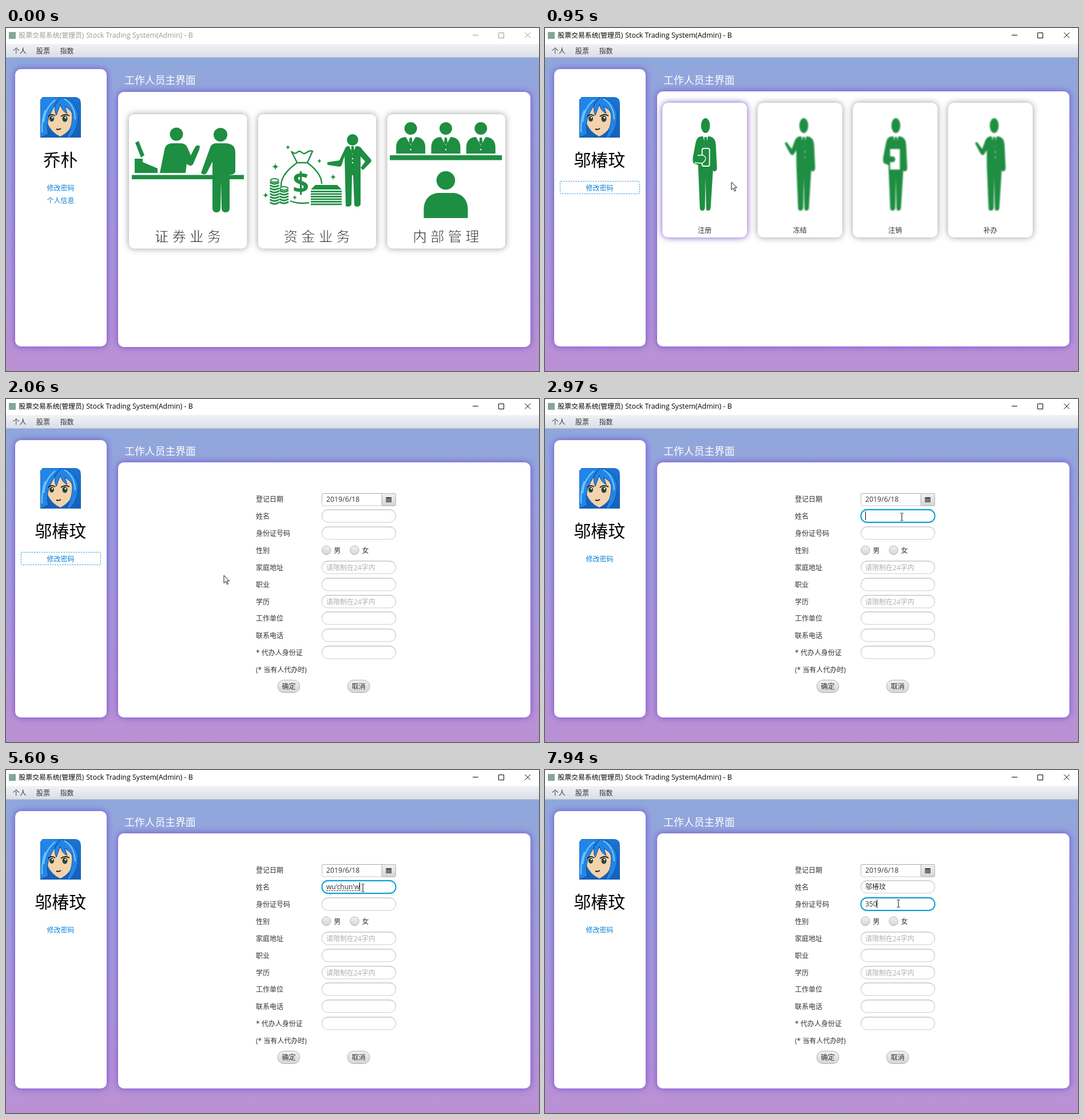
An HTML page for the animation above (8000 ms loop, 932 px wide and 601 px high).

```html
<!DOCTYPE html>
<html lang="zh-CN">
<head>
<meta charset="utf-8">
<title>股票交易系统</title>
<style>
  html, body { margin: 0; width: 100%; height: 100%; overflow: hidden; background: #fff; }
  svg { display: block; width: 100vw; height: 100vh; }
  text { font-family: 'Open Sans', 'Noto Sans CJK SC', 'Noto Sans CJK', sans-serif; font-size: 12px; fill: #333; white-space: pre; }
  .mid { text-anchor: middle; }
  .panel { fill: #fff; filter: drop-shadow(0 0 6px rgba(105, 60, 215, .85)); }
  .card { fill: #fff; filter: drop-shadow(0 0 6px rgba(0, 0, 0, .4)); }
  .card.hover { filter: drop-shadow(0 0 6px rgba(95, 50, 180, .85)); }
  .green { fill: #1e8e42; }
  .line { fill: none; stroke: #1e8e42; }
  .white { fill: #fff; }
  .soft { filter: blur(.9px); }
  .link { fill: #0a80d6; }
  .hint { fill: #aab2ab; }
  .name { font-size: 30px; fill: #000; }
  .big { font-size: 24.3px; font-weight: 300; fill: #222; stroke: #fff; stroke-width: .7; }
  .field { fill: #fff; stroke: url(#edge); }
  .field.focus { stroke: #039ed3; stroke-width: 1.8; filter: drop-shadow(0 0 1px #8fd4ee); }
  .button { fill: url(#metal); stroke: #b2b2b2; }
  .ink { stroke: #000; fill: none; }
</style>
</head>
<body>
<svg id="stage" viewBox="0 0 932 601" preserveAspectRatio="none" xmlns="http://www.w3.org/2000/svg"></svg>
<script>
const LOOP = 8000;
const STAFF = '邬椿玟';

// ---- drawing helpers ----
const text = (x, y, s, cls = '', more = '') => `<text x="${x}" y="${y}" class="${cls}" ${more}>${s}</text>`;
const rect = (x, y, w, h, r = 0, cls = 'green', more = '') =>
  `<rect x="${x}" y="${y}" width="${w}" height="${h}" rx="${r}" class="${cls}" ${more}/>`;
const path = (d, cls = 'green', more = '') => `<path d="${d}" class="${cls}" ${more}/>`;
const dot = (x, y, r, cls = 'green') => `<circle cx="${x}" cy="${y}" r="${r}" class="${cls}"/>`;
const at = (x, y, body, more = '') => `<g transform="translate(${x} ${y})" ${more}>${body}</g>`;
const range = (n, f) => Array.from({ length: n }, (_, i) => f(i)).join('');
const scene = (id, body) => `<g id="${id}">${body}</g>`;
const grad = (id, ...stops) => `<linearGradient id="${id}" x2="0" y2="1">` +
  stops.map((c, i) => `<stop offset="${i / (stops.length - 1)}" stop-color="${c}"/>`).join('') + '</linearGradient>';

// ---- people ----
const BUST = 'M-25.5 44V33C-25.5 20-17 15-8 15H8C17 15 25.5 20 25.5 33V44Z';
const bust = suit => dot(0, 0, 11) + path(BUST) + (suit
  ? path('M-9 14L0 30 9 14Z', 'white') + path('M-2 16H2L3 25 0 29-3 25Z') + dot(0, 37, 1.3, 'white') : '');
const row = (x, y, suit) =>
  range(3, i => at(x + 61.3 * i, y, bust(suit))) + rect(x - 36.5, y + 47, 196, 8.5);

const ARMS = {
  folded: 'L-13 240L-21 237Q-23 234-22 226L-17 200Q-15 191-8 190Z',
  raised: 'L-13 214L-18 222Q-21 224-24 220L-33 203Q-33 198-29 201L-21 212-16 198Q-13 191-8 190Z'
};
const stander = (x, arm, extra = '', cls = '') => at(x, 0,
  '<ellipse cy="171" rx="7.8" ry="13" class="green"/>' +
  path('M-8 190H8Q17 192 18 204L20 246Q19 252 15 251L13 250 9 314Q9 320 4 320Q1 320 1 314L0 262-1 314Q-1 320-6 320Q-10 320-10 314L-13 240' + ARMS[arm]) +
  path('M-4.5 189L0 209 4.5 189Z', 'white') + path('M-2 191h4l1 12-3 5-3-5Z') + extra, `class="${cls}"`);
const buttons = dot(2, 217, 1, 'white') + dot(2, 227, 1, 'white');
const phone = rect(-6, 211, 13, 31, 3, 'green', 'stroke="#fff" stroke-width="1.8"') +
  path('M-14 223H-4Q1 226 0 230T-6 237L-19 236', 'green', 'stroke="#fff" stroke-width="1.3"');
const paper = rect(-10, 212, 17, 36, 0, 'white') + path('M-16 225H-4Q2 230-4 235H-16Z');

// ---- card pictures ----
const counter =
  path('M226 201L232 198 242 223 236 227ZM225 229H239V235L265 246V254H225Z') +
  rect(220, 257.5, 196, 7.5) + dot(298, 186, 11.5) +
  path('M269 254L277 214Q279 202 291 202H305Q315 202 318 211L323 223 331 208Q334 204 339 207L338 213 327 239Q322 244 316 238L314 254Z') +
  dot(375, 187, 12) +
  path('M366 202H385Q401 203 401 218V252Q400 257 391 257V317Q390 323 384 323T377 317L376 268 375 317Q374 323 368 323T361 317V234L351 254Q346 259 341 254L356 212Q358 203 366 202Z');

const star = ([x, y, r]) => at(x, y, path(`M0-${r}Q0 0 ${r} 0Q0 0 0 ${r}Q0 0-${r} 0Q0 0 0-${r}Z`));
const coins = (x, y, n) => `<ellipse cx="${x}" cy="${y}" rx="7" ry="3" class="line" stroke-width="2"/>` +
  range(n, i => path(`M${x - 7} ${y + 4 + 5 * i}q7 4.5 14 0`, 'line', 'stroke-width="2.8" stroke-linecap="round"'));
const money =
  [[493, 209, 5], [471, 243, 7], [454, 293, 6], [548, 233, 5], [572, 261, 6], [505, 297, 5]].map(star).join('') +
  path('M509 236L499 216Q505 222 509 218T517 218T526 218T536 216L527 236H509C492 248 480 262 481 278M527 236C543 248 552 260 552 273M497 303Q510 309 530 306', 'line', 'stroke-width="2.4"') +
  text(515.5, 288.5, '$', 'mid', 'style="font-size:50px;font-weight:700;fill:#1e8e42"') +
  coins(469.5, 267, 8) + coins(486, 281, 5) +
  path('M541 275H579L587 283H533Z') + range(6, i => rect(533, 285 + 4.5 * i, 54, 2.8)) +
  dot(606, 196, 10) +
  path('M598 207h16q6 0 9 6l15 17q2 3-1 6l-13 13-4-4 8-11-8-9L620 309q-1 4-6 4-5 0-5-4L607 258h-2L604 309q-1 4-6 4-5 0-4-4L592 224l-5 16q-1 3-4 3l-20-3q-3-3 0-5l20-3 9-19q2-6 6-6z') +
  path('M600 206L606 222 612 206Z', 'white') + path('M604 207h4l1 10-3 4-3-4Z') +
  dot(606, 229, 1.2, 'white') + dot(606, 236, 1.2, 'white');

const office = row(707.7, 176, true) + dot(769, 267, 16.3) +
  path('M730.5 333V318C730.5 298 744 289 757 289H781C794 289 807.5 298 807.5 318V333Z');

// ---- scenes ----
const home = rect(196, 112, 721, 447, 10, 'panel') +
  ['证 券 业 务', '资 金 业 务', '内 部 管 理'].map((s, i) =>
    rect(215 + 225.8 * i, 151, 206.5, 235.5, 9, 'card', i ? '' : 'id="first"') +
    text(318 + 225.8 * i, 373.5, s, 'big mid')).join('') + counter + money + office;

const grid = ['注册', '冻结', '注销', '补办'].map((s, i) =>
    rect(205.3 + 166.5 * i, 131, 148, 236, 10, i ? 'card' : 'card hover') +
    text(279.3 + 166.5 * i, 359, s, 'mid')).join('') +
  stander(280.7, 'folded', phone) + stander(452.5, 'raised', buttons, 'soft') +
  stander(613.5, 'folded', paper, 'soft') + stander(785.5, 'raised', buttons, 'soft');

const pair = ['个人注册', '公司注册'].map((s, i) =>
    rect(213 + 225.5 * i, 150.5, 212, 235.5, 10, i ? 'card' : 'card hover') +
    text(318.8 + 225.5 * i, 372, s, 'mid') + row(257.5 + 225.5 * i, 236, i)).join('');

const LABELS = ['登记日期', '姓名', '身份证号码', '性别', '家庭地址', '职业', '学历', '工作单位', '联系电话', '* 代办人身份证', '(* 当有人代办时)'];
const rowY = i => Math.round(175.4 + 29.85 * i);
const pill = i => rect(552.5, rowY(i) - 11, 129, 22, 10.5, 'field', `id="field${i}"`);
const form = LABELS.map((s, i) => text(437, rowY(i) + 4.5, s)).join('') +
  [1, 2, 4, 5, 6, 7, 8, 9].map(pill).join('') +
  [4, 6].map(i => text(560, rowY(i) + 4.5, '请限制在24字内', 'hint')).join('') +
  rect(552.5, 165.5, 129, 21.5, 2.5, 'field') + text(560, 180.3, '2019/6/18', '', 'style="font-size:12.3px"') +
  rect(657, 165.5, 24.5, 21.5, 2.5, 'button') + rect(664.5, 172, 9.5, 9, 0, '', 'fill="#444"') +
  range(9, i => rect(665.5 + 2.8 * (i % 3), 174.6 + 2.1 * Math.floor(i / 3), 1.8, 1.2, 0, '', 'fill="#ccc"')) +
  ['男', '女'].map((s, i) => dot(560.2 + 49.3 * i, 265, 7.7, 'button') + text(573.3 + 49.3 * i, 269.7, s)).join('') +
  ['确定', '取消'].map((s, i) => rect(475.2 + 122.2 * i, 492.5, 38.5, 22, 10.5, 'button') +
    text(494.5 + 122.2 * i, 508, s, 'mid')).join('') +
  text(560, 209, '', '', 'id="nameText"') + text(560, 239, '', '', 'id="idText"') +
  '<path id="compose" stroke="#333" stroke-dasharray="3 1.5"/>' +
  rect(0, 0, 1, 15, 0, '', 'id="caret" fill="#000"');

const avatar = '<g clip-path="url(#face)">' + rect(60, 121, 71, 71, 0, '', 'fill="url(#hair)"') +
  path('M72 150Q80 134 100 137 116 142 118 160 115 180 95 190 80 184 72 166Z', '', 'fill="#f3d3ab"') +
  path('M60 121H96Q84 135 76 154 70 168 74 186L60 192ZM96 121Q122 126 126 152 127 176 112 192H106Q119 166 115 146L103 137 107 150Q98 146 95 134L88 153Q84 146 86 132Z', '', 'fill="#2185e8" stroke="#123f80" stroke-width=".8"') +
  path('M66 165Q68 140 86 126M102 124Q120 134 121 160M63 183Q62 160 69 144', '', 'fill="none" stroke="#6fc0fa" stroke-width="2.4"') +
  path('M74 155q5-6 12-1M96 155q7-6 15-1M88 177q4 2 8-1', '', 'fill="none" stroke="#2b1f1c" stroke-width="2"') +
  '<ellipse cx="80" cy="159" rx="4" ry="5" fill="#24453d"/><ellipse cx="103" cy="159" rx="4.5" ry="5.5" fill="#24453d"/>' +
  dot(81, 157, 1.3, 'white') + dot(104, 157, 1.5, 'white') + '</g>';

stage.innerHTML = '<defs>' +
  grad('sky', '#8fa7dc', '#a49cd8', '#bb90d4') + grad('bar', '#f0f2f7', '#dadde4') + grad('metal', '#f1f1f1', '#d5d5d5') +
  grad('edge', '#a9a9a9', '#cccccc') + grad('hair', '#1b74d2', '#1560b8') +
  '<clipPath id="face"><path d="M64 121H122Q131 122 131 133V192H60V126Z"/></clipPath></defs>' +
  rect(0, 0, 932, 601, 0, 'white') + rect(0, 52, 932, 549, 0, '', 'fill="url(#sky)"') +
  rect(0, 28, 932, 24, 0, '', 'fill="url(#bar)"') + rect(0, 51, 932, 1, 0, '', 'fill="#b9bfd0"') +
  rect(5, 7, 12, 12, 0, '', 'fill="#83a898"') +
  '<g id="title">' + text(22.3, 17.3, '股票交易系统(管理员)', '', 'style="fill:inherit;font-size:11.9px"') +
  text(140.2, 17.3, 'Stock Trading System(Admin) - B', '', 'style="fill:inherit;font-size:12.45px"') +
  path('M816 12.5h10M861.5 8.5h9v9h-9zM907.5 8l9.5 9.5m0-9.5l-9.5 9.5', '', 'fill="none"') + '</g>' +
  ['个人', '股票', '指数'].map((s, i) => text(11.7 + 41.4 * i, 45, s)).join('') +
  rect(16, 72, 160, 486, 10, 'panel') + avatar +
  text(95.3, 242, '', 'name mid', 'id="owner"') + text(95.5, 284.5, '修改密码', 'link mid') +
  text(95.5, 306.5, '个人信息', 'link mid', 'id="profile"') +
  rect(26.5, 268.5, 139, 22, 1, '', 'id="ring" fill="none" stroke="#2a9fd8" stroke-dasharray="2.5 1.8"') +
  text(207.3, 97.5, '工作人员主界面', '', 'style="font-size:17.8px;fill:#fff"') +
  scene('main', rect(196, 111, 721, 447, 10, 'panel')) +
  scene('home', home) + scene('grid', grid) + scene('pair', pair) + scene('form', form) +
  scene('arrow', path('M0 0V13.5L3.2 10.6 5.6 15.8 7.6 14.9 5.3 9.8H9.6Z', '', 'fill="#fff" stroke="#000" stroke-width=".9"')) +
  scene('beam', path('M-2.5-6.5H-.5M.5-6.5H2.5M0-6V6M-2.5 6.5H-.5M.5 6.5H2.5', 'ink'));

// ---- timeline ----
const PATH = [[170, 395, 540], [630, 318, 262], [800, 318, 262], [950, 326, 270], [1090, 326, 270], [1420, 314, 258],
  [1570, 314, 258], [1750, 407, 327], [1890, 407, 327], [2060, 381, 309], [2590, 624, 206.5],
  [6470, 624, 206.5], [6690, 618, 234]];
const SCENES = [[0, 'home'], [800, 'grid'], [1170, 'pair'], [1890, 'form']];
const NAME = [[0, ''], [3520, 'w'], [3680, 'wu'], [3820, "wu'c"], [4130, 'wu'], [4210, 'w'], [4360, ''],
  [4830, 'w'], [4910, 'wu'], [4990, "wu'c"], [5160, "wu'ch"], [5220, "wu'chu"], [5370, "wu'chun"],
  [5600, "wu'chun'w"], [5680, "wu'chun'we"], [5770, "wu'chun'wen"], [5920, STAFF]];
const NUMBER = [[0, ''], [7310, '3'], [7620, '35'], [7940, '350']];

const $ = id => document.getElementById(id);
const show = (id, on) => { $(id).style.display = on ? '' : 'none'; };
const latest = (table, t) => table.filter(s => s[0] <= t).pop()[1];
const within = (t, a, b) => t >= a && t < b;

function pointer(t) {
  const i = PATH.findIndex(p => p[0] > t);
  if (i < 0) return PATH[PATH.length - 1].slice(1);
  const [a, b] = [PATH[Math.max(i - 1, 0)], PATH[i]];
  const k = Math.max(0, Math.floor((t - a[0]) / 76) * 76 / (b[0] - a[0] || 1));
  return [1, 2].map(n => a[n] + (b[n] - a[n]) * k);
}

function render(t) {
  const current = latest(SCENES, t);
  SCENES.forEach(([, id]) => show(id, id === current));
  show('main', current !== 'home');

  const active = t >= 170;
  $('title').setAttribute('fill', active ? '#000' : '#999');
  $('title').lastChild.setAttribute('stroke', active ? '#000' : '#999');
  $('owner').textContent = t < 800 ? '乔朴' : STAFF;
  show('profile', t < 800);
  show('ring', within(t, 170, 1170) || within(t, 1890, 2740));
  $('first').classList.toggle('hover', t >= 470);

  const [x, y] = pointer(t);
  const overField = t > 2060 && x > 552;
  show('arrow', active && !overField);
  show('beam', overField && !within(t, 2810, 2970));
  $(overField ? 'beam' : 'arrow').setAttribute('transform', `translate(${x} ${y})`);

  if (current !== 'form') return;
  const onId = t >= 6850;
  $('field1').classList.toggle('focus', within(t, 2740, 6850));
  $('field2').classList.toggle('focus', onId);
  $('nameText').textContent = latest(NAME, t);
  $('idText').textContent = latest(NUMBER, t);
  const end = 560 + $(onId ? 'idText' : 'nameText').getComputedTextLength();
  $('compose').setAttribute('d', t < 5920 && end > 560 ? `M560 211.5H${end}` : '');
  $('caret').setAttribute('x', Math.round(end - .5));
  $('caret').setAttribute('y', onId ? 227 : 197);
  show('caret', t >= 2740 && !within(t, 3290, 3520));
}

const start = performance.now();
function tick() {
  render((performance.now() - start) % LOOP);
  requestAnimationFrame(tick);
}
tick();
</script>
</body>
</html>
```
